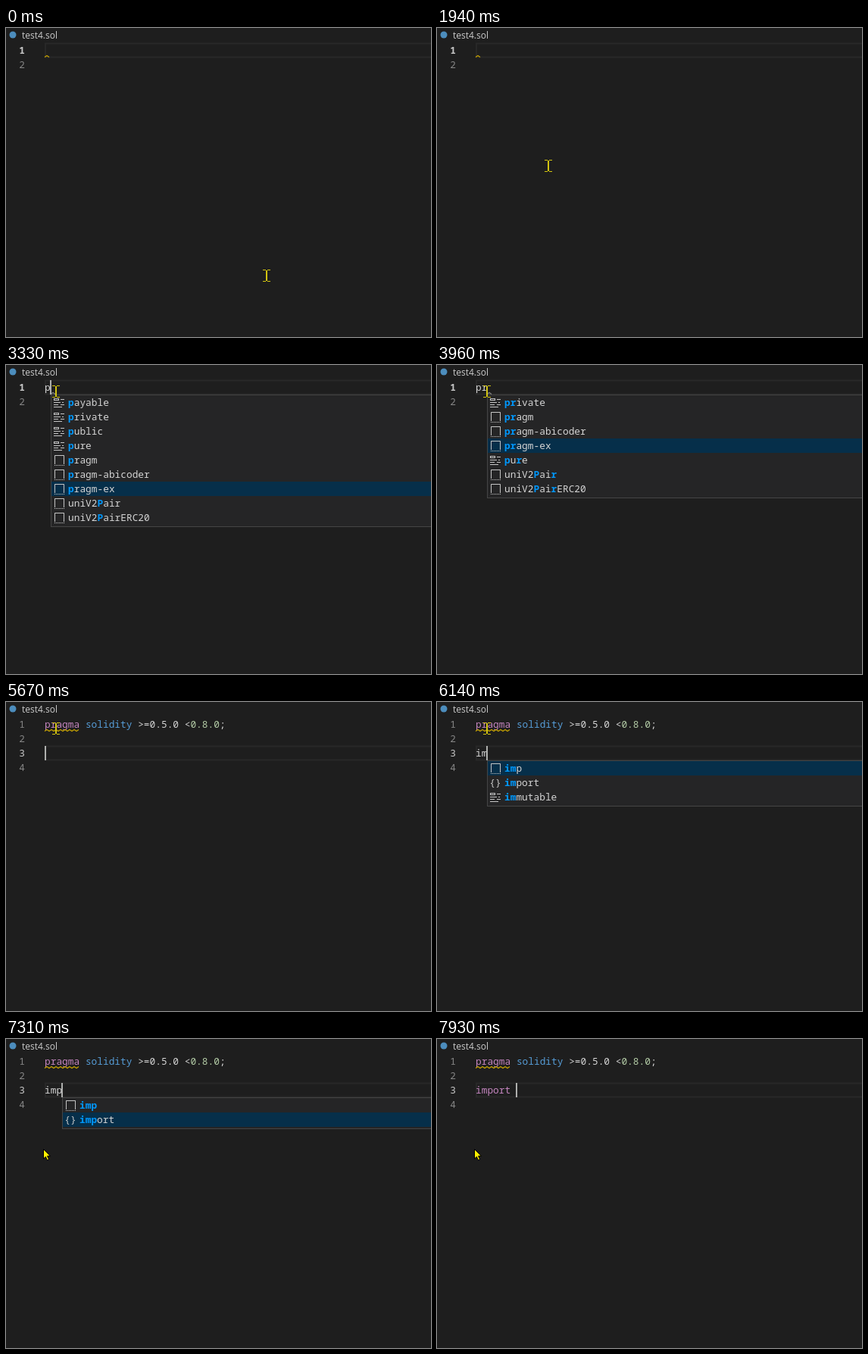
These frames come from a looping animation (561x408 px, 8 s). An HTML page with a canvas:

```html
<!DOCTYPE html>
<html lang="en">
<head>
<meta charset="utf-8">
<title>Solidity snippets</title>
<style>
  html, body { margin: 0; width: 100%; height: 100%; overflow: hidden; background: #1e1e1e; }
  canvas { display: block; }
</style>
</head>
<body>
<canvas id="stage" width="561" height="408"></canvas>
<script>
const ctx = document.getElementById('stage').getContext('2d', { alpha: false });
const WIDTH = 561, HEIGHT = 408, LOOP = 8000;
const LEFT = 51, TOP = 20, ROW = 19, CHAR = 7.697;
const MONO = '12.83px "Noto Sans Mono", "DejaVu Sans Mono", monospace';
const BOLD = 'bold ' + MONO;
const INK = '#d4d4d4', PINK = '#c586c0', BLUE = '#569cd6', GREEN = '#b5cea8';
const WARN = '#cca700', HINT = '#8c8c8c';

const ICONS = {
  k: new Path2D('M15 4h-5V3h5v1zm-1 3h-2v1h2V7zm-4 0H1v1h9V7zm2 6H1v1h11v-1zm-5-3H1v1h6v-1zm8 0h-5v1h5v-1zM8 2v3H1V2h7zM7 3H2v1h5V3z'),
  s: new Path2D('M2.5 1l-.5.5V13h1V2h11v11h1V1.5l-.5-.5zM2 14h1v1H2zm2 0h1v1H4zm2 0h1v1H6zm2 0h1v1H8zm2 0h1v1h-1zm2 0h1v1h-1zm2 0h1v1h-1z')
};
const ARROW = new Path2D('M.5 .5V13L3.4 10.4L5.4 15L7.6 14L5.6 9.6H9.4z');

// Each entry is "icon:label"; k keyword, s snippet, m module.
const list = (query, selected, items) => ({
  query, selected,
  items: items.split(' ').map(item => item.split(':'))
});
const importList = selected => list('imp', selected, 's:imp m:import');

const PRAGMA = [['pragma', PINK], [' solidity', BLUE], [' >=0.5.0 <', INK], ['0.8.0', GREEN], [';', INK]];
const pragmaMark = [1, 0, 6, WARN];
const plain = text => [[text, INK]];

// Editor changes, merged in order of time.
const EDITS = [
  [0, { lines: [[], []], active: 1, col: 0, caret: false, popup: null, marks: [[1, 0, 1, WARN]] }],
  [2560, { caret: true }],
  [3030, { caret: false }],
  [3260, { lines: [plain('p'), []], col: 1, caret: true, marks: [[1, 1, 1, HINT]] }],
  [3330, { popup: list('p', 6, 'k:payable k:private k:public k:pure s:pragm s:pragm-abicoder s:pragm-ex s:uniV2Pair s:uniV2PairERC20') }],
  [3410, { lines: [plain('pr'), []], col: 2, marks: [[1, 2, 1, HINT]],
    popup: list('pr', 3, 'k:private s:pragm s:pragm-abicoder s:pragm-ex k:pure s:uniV2Pair s:uniV2PairERC20') }],
  [3960, { caret: false }],
  [4360, { lines: [PRAGMA, []], col: 31, caret: true, popup: null, marks: [] }],
  [4810, { marks: [pragmaMark, [1, 31, 1, WARN]] }],
  [4890, { caret: false }],
  [5060, { lines: [PRAGMA, [], []], active: 2, col: 0, caret: true, marks: [pragmaMark] }],
  [5590, { caret: false }],
  [5670, { lines: [PRAGMA, [], [], []], active: 3, caret: true }],
  [5990, { lines: [PRAGMA, [], plain('i'), []], col: 1,
    popup: list('i', 0, 's:imp m:import k:if s:ifelse k:immutable k:indexed k:int k:int256 s:interf k:interface k:internal k:is') }],
  [6140, { lines: [PRAGMA, [], plain('im'), []], col: 2, popup: list('im', 0, 's:imp m:import k:immutable') }],
  [6310, { lines: [PRAGMA, [], plain('imp'), []], col: 3, popup: importList(0) }],
  [6770, { caret: false }],
  [7230, { caret: true, popup: importList(1) }],
  [7550, { lines: [PRAGMA, [], [['import', PINK]], []], col: 6, popup: null }],
  [7930, { col: 7 }]
];

// Pointer positions: time, x, y.
const POINTER = [
  [0, 344, 327], [70, 232, 224], [150, 208, 226],
  [1940, 147, 182], [2020, 92, 118], [2100, 54, 74], [2170, 62, 49], [2250, 72, 51],
  [2400, 70, 46], [2480, 68, 40], [2560, 66, 36], [2630, 66, 35], [7310, 49, 145]
];
const ARROW_FROM = 7310;

const lineTop = line => TOP + (line - 1) * ROW;
const colX = col => LEFT + col * CHAR;

function rect(x, y, w, h, color) {
  ctx.fillStyle = color;
  ctx.fillRect(x, y, w, h);
}

function text(str, x, y, color, font = MONO) {
  ctx.font = font;
  ctx.fillStyle = color;
  ctx.fillText(str, x, y);
}

function drawTitle() {
  ctx.fillStyle = '#4c8dbd';
  ctx.beginPath();
  ctx.arc(9, 9, 4.5, 0, Math.PI * 2);
  ctx.fill();
  text('test4.sol', 21, 14, '#cccccc', '12px "Open Sans", "Noto Sans", sans-serif');
}

function drawSquiggle([line, col, length, color]) {
  const x0 = Math.round(colX(col)), y = lineTop(line) + 16.5;
  const end = x0 + length * CHAR;
  ctx.strokeStyle = color;
  ctx.lineWidth = 1.1;
  ctx.beginPath();
  ctx.moveTo(x0, y + 2);
  for (let x = x0 + 3, up = true; x <= end; x += 3, up = !up) ctx.lineTo(x, y + (up ? 0 : 2));
  ctx.stroke();
}

function drawLines({ lines, active, marks }) {
  ctx.strokeStyle = '#282828';
  ctx.lineWidth = 2;
  ctx.strokeRect(LEFT + 1, lineTop(active) + 0.5, WIDTH, ROW - 1);
  lines.forEach((tokens, i) => {
    const line = i + 1, base = lineTop(line) + 14, on = line === active;
    text(line, 17.2, base, on ? '#c6c6c6' : '#858585', on && line === 1 ? BOLD : MONO);
    let col = 0;
    for (const [part, color] of tokens) {
      text(part, colX(col), base, color);
      col += part.length;
    }
  });
  marks.forEach(drawSquiggle);
}

function drawCaret({ caret, active, col }) {
  if (caret) rect(Math.max(LEFT, Math.floor(50.4 + col * CHAR)), lineTop(active), 2, ROW, '#aeafad');
}

function drawLabel(label, query, x, y) {
  let hit = 0;
  [...label].forEach((char, i) => {
    const match = hit < query.length && char.toLowerCase() === query[hit];
    if (match) hit++;
    text(char, x + i * CHAR, y, match ? '#0097fb' : INK, match ? BOLD : MONO);
  });
}

function drawIcon(kind, x, y) {
  if (kind === 'm') return text('{}', x + 0.3, y + 12, '#c5c5c5');
  ctx.save();
  ctx.translate(x, y);
  ctx.fillStyle = '#c5c5c5';
  ctx.fill(ICONS[kind], 'evenodd');
  ctx.restore();
}

function drawPopup({ popup, active, col }) {
  if (!popup) return;
  const x = Math.floor(colX(col) + 0.35), y = lineTop(active + 1);
  const height = popup.items.length * ROW + 4;
  rect(x, y, WIDTH, height, '#454545');
  rect(x + 1, y + 1, WIDTH, height - 2, '#252526');
  popup.items.forEach(([icon, label], i) => {
    const rowY = y + 1 + i * ROW;
    if (i === popup.selected) rect(x + 1, rowY, WIDTH, ROW, '#062f4a');
    drawIcon(icon, x + 3, rowY + 2);
    drawLabel(label, popup.query, x + 23, rowY + 14);
  });
}

function drawPointer(t) {
  const [, x, y] = POINTER.filter(step => step[0] <= t).pop();
  if (t >= ARROW_FROM) {
    ctx.save();
    ctx.translate(x, y);
    ctx.fillStyle = '#fff200';
    ctx.strokeStyle = '#000';
    ctx.lineWidth = 1;
    ctx.fill(ARROW);
    ctx.stroke(ARROW);
    ctx.restore();
    return;
  }
  const color = '#d2c410';
  rect(x - 1, y - 7, 2, 14, color);
  for (const serifY of [y - 8, y + 7]) {
    rect(x - 5, serifY, 4, 1, color);
    rect(x + 1, serifY, 4, 1, color);
  }
}

function render(t) {
  const state = Object.assign({}, ...EDITS.filter(edit => edit[0] <= t).map(edit => edit[1]));
  rect(0, 0, WIDTH, HEIGHT, '#1e1e1e');
  drawTitle();
  drawLines(state);
  drawCaret(state);
  drawPopup(state);
  drawPointer(t);
}

const start = performance.now();
function tick() {
  render((performance.now() - start) % LOOP);
  requestAnimationFrame(tick);
}
tick();
</script>
</body>
</html>
```
